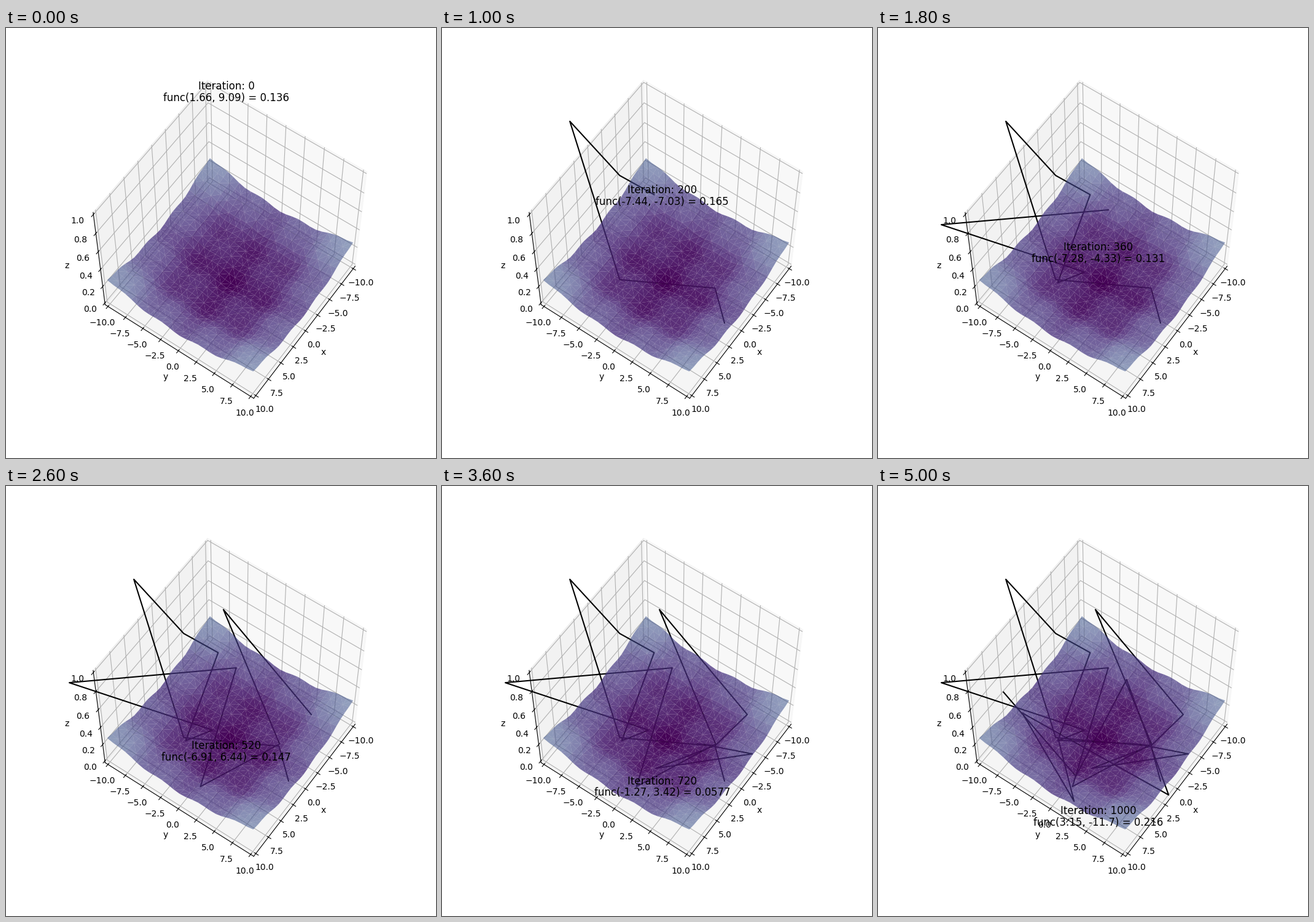
These frames come from a looping animation (700 by 700 pixels, 5.2 s). A matplotlib script:

```python
import numpy as np
import matplotlib.pyplot as plt
from matplotlib.animation import FuncAnimation
from matplotlib.colors import ListedColormap

INTERVAL = 200
ITERS_PER_FRAME = 40
SCALE = 751

# the search jumps to a far point or falls back into one of two valleys
VALLEYS = np.array([(-2.2, 5.1), (3.3, -4.0)])
FALL = None
JUMPS = [
    (1.66, 9.09), FALL, FALL, (-6.44, -18.15), (-6.4, -11.2), (-7.44, -7.03),
    FALL, (0.4, -2.3), (8.44, -16.17), (-7.28, -4.33), (7.7, 1.2), FALL,
    (-11.33, -9), (-6.91, 6.44), FALL, (-2.9, 9.8), (3.9, 1.2), FALL,
    (-1.27, 3.42), FALL, (9.6, 2.8), (3.6, -8.8), (3.35, 11.27),
    (-7.4, -1.8), (6.2, 0.6), (3.15, -11.74),
]


def func(x, y):
    """Rastrigin function, scaled down."""
    waves = np.cos(2 * np.pi * x) + np.cos(2 * np.pi * y)
    return (20 + x**2 + y**2 - 10 * waves) / SCALE


def fall(pos, rng):
    """Go to the valley on this side, or across when already in it."""
    side = 0 if pos[1] > 0 else 1
    if np.hypot(*(VALLEYS[side] - pos)) < 3:
        side = 1 - side
    return VALLEYS[side] + rng.normal(0, 0.2, 2)


def search_path():
    rng = np.random.default_rng(1)
    path = []
    for jump in JUMPS:
        path.append(fall(path[-1], rng) if jump is FALL else np.array(jump))
    return np.array(path)


def fading_viridis():
    """Viridis that grows more transparent with height."""
    t = np.linspace(0, 1, 256)
    colors = plt.get_cmap("viridis")(t)
    colors[:, 3] = np.clip(1 - 1.85 * t, 0, 1)
    return ListedColormap(colors)


fig = plt.figure(figsize=(7, 7), dpi=100)
ax = fig.add_subplot(projection="3d", computed_zorder=False)
ax.apply_aspect = lambda position=None: None  # fill the whole subplot box

side = np.linspace(-10, 10, 25)
gx, gy = (g.ravel() for g in np.meshgrid(side, side))
ax.plot_trisurf(gx, gy, func(gx, gy), cmap=fading_viridis(), vmin=0, vmax=1,
                linewidth=0, antialiased=True, zorder=2.5)
trail, = ax.plot([], [], [], color="black", lw=1.5, zorder=2)

margin = 1 / 48
edge = 10 + 20 * margin
ax.set_xticks(np.linspace(-10, 10, 9))
ax.set_yticks(np.linspace(-10, 10, 9))
ax.set_zticks(np.linspace(0, 1, 6))
ax.set_xlim(-edge, edge)
ax.set_ylim(-edge, edge)
ax.set_zlim(-margin, 1 + margin)
ax.set_xlabel("x")
ax.set_ylabel("y")
ax.set_zlabel("z")
ax.set_box_aspect((1, 1, 1), zoom=0.94676)
ax.view_init(elev=60, azim=35)

path = search_path()


def update(i):
    xs, ys = path[:i + 1].T
    trail.set_data_3d(xs, ys, func(xs, ys))
    x, y = path[i]
    # 3D axes lower the given y by a further factor of 0.92
    ax.set_title(f"Iteration: {i * ITERS_PER_FRAME}\n"
                 f"func({x:.3g}, {y:.3g}) = {func(x, y):.3g}",
                 y=0.92 ** i, linespacing=1.04)
    return trail,


anim = FuncAnimation(fig, update, frames=len(path), interval=INTERVAL,
                     repeat=True, repeat_delay=0)
plt.show()
```
